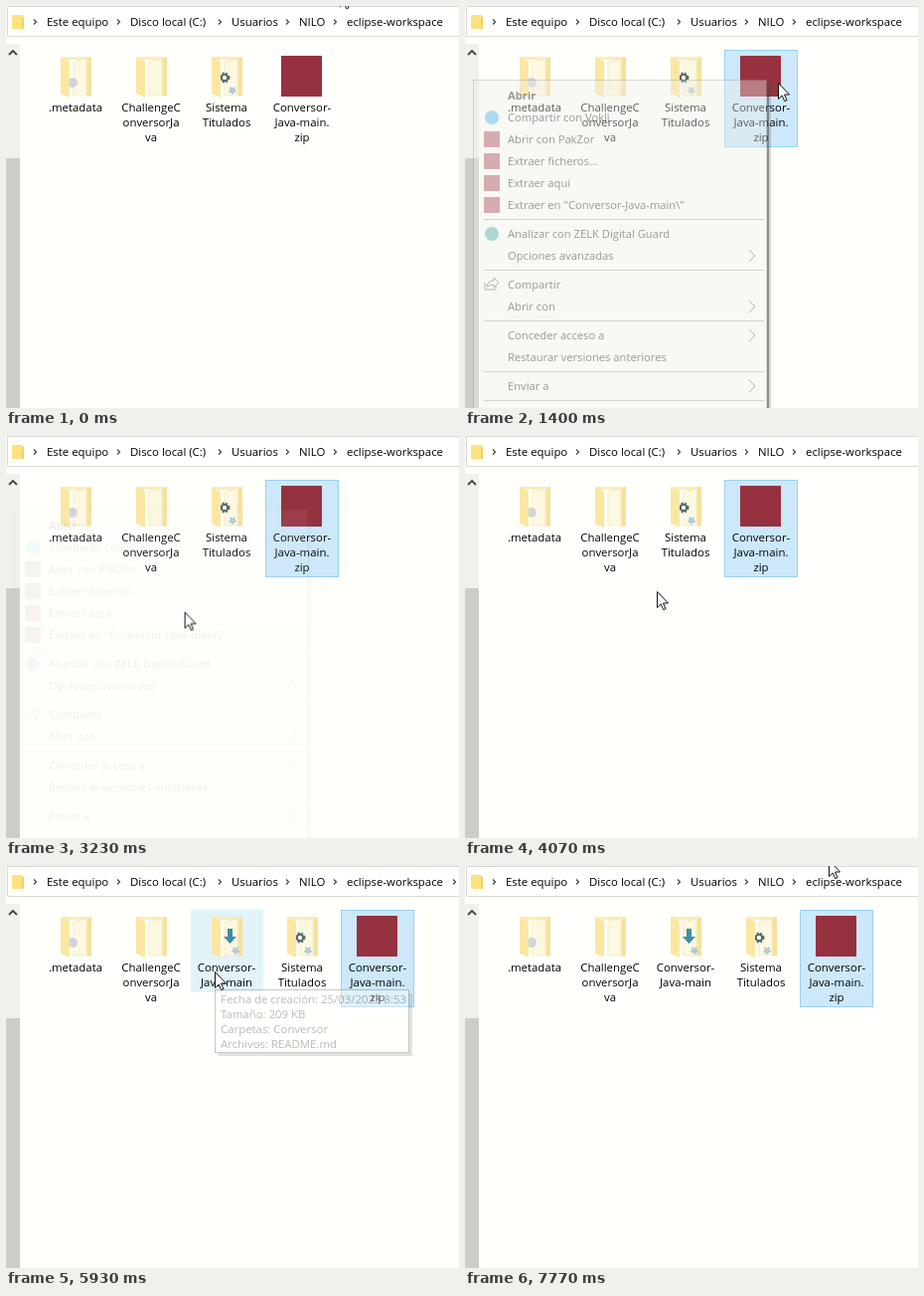
Recreate the animation shown at these times as an HTML page. Size 456x404 px, loop 7830 ms.

```html
<!DOCTYPE html>
<html lang="es">
<head>
<meta charset="utf-8">
<title>Extraer archivo</title>
<style>
html, body { margin: 0; width: 100%; height: 100%; overflow: hidden; background: #fffffc; }
svg { display: block; width: 456px; height: 404px; }
text { font: 11.4px "Open Sans", "Noto Sans", sans-serif; fill: #000; }
#menu text { font-size: 11.2px; }
#tip text { fill: #606060; }
.mid { text-anchor: middle; }
.line { fill: none; stroke: #444; }
#cursor, #moved, #fresh, #pick, #hover, #menu, #shade, #row, #tip, #more {
  animation: 7830ms linear infinite;
}
#cursor { animation-name: cursor; animation-timing-function: ease-in-out; }
#menu { animation-name: menu; }
#tip { animation-name: tip; }
#hover { animation-name: hover; }
#shade { animation-name: shade; }
#moved { animation-name: moved; animation-timing-function: step-end; }
#fresh { animation-name: fresh; animation-timing-function: step-end; }
#pick { animation-name: pick; animation-timing-function: step-end; }
#row { animation-name: row; animation-timing-function: step-end; }
#more { animation-name: more; animation-timing-function: step-end; }

@keyframes cursor {
  0%, .383% { transform: translate(336px, -16px); }
  6.003%, 11.494% { transform: translate(312px, 68px); }
  15.326% { transform: translate(315px, 77px); }
  19.54% { transform: translate(315px, 77px); animation-timing-function: ease-in; }
  21.328% { transform: translate(292px, 133px); animation-timing-function: ease-out; }
  28.48%, 35.3% { transform: translate(174px, 178px); }
  36.143%, 37.931% { transform: translate(178px, 179px); }
  47.254%, 49.808% { transform: translate(184px, 170px); }
  51.98%, 58.365% { transform: translate(193px, 156px); }
  65.134%, 77.3% { transform: translate(210px, 106px); }
  83.014%, 85.951% { transform: translate(361px, 12px); }
  89.017%, 97.957% { transform: translate(354px, 13px); }
  99.2%, 100% { transform: translate(366px, -6px); }
}
@keyframes menu {
  0%, 16.603% { opacity: 0; }
  19.8%, 37.931% { opacity: 1; }
  41.5%, 100% { opacity: 0; }
}
@keyframes shade {
  0%, 16.603% { opacity: 0; }
  17.5%, 37.931% { opacity: 1; }
  41.5%, 100% { opacity: 0; }
}
@keyframes row {
  0% { opacity: 0; transform: translateY(-22px); }
  21.7% { opacity: 1; transform: translateY(-22px); }
  24% { opacity: 1; transform: none; }
  100% { opacity: 1; transform: none; }
}
@keyframes pick {
  0% { opacity: 0; }
  3.83% { opacity: .5; }
  11.494%, 100% { opacity: 1; }
}
@keyframes moved {
  0% { transform: none; }
  54.917%, 100% { transform: translateX(76px); }
}
@keyframes fresh {
  0% { opacity: 0; }
  54.917%, 100% { opacity: 1; }
}
@keyframes hover {
  0%, 61% { opacity: 0; }
  62.5%, 78.8% { opacity: 1; }
  81%, 100% { opacity: 0; }
}
@keyframes tip {
  0%, 75.72% { opacity: 0; }
  75.73% { opacity: .42; }
  77.1%, 80.3% { opacity: 1; }
  83.014% { opacity: .24; }
  84.6%, 100% { opacity: 0; }
}
@keyframes more {
  0% { opacity: 0; }
  61.5% { opacity: 1; }
  98.4%, 100% { opacity: 0; }
}
</style>
</head>
<body>
<svg id="stage" viewBox="0 0 456 404"></svg>
<script>
const text = (x, y, s, extra = '') => `<text x="${x}" y="${y}" ${extra}>${s}</text>`;
const rect = (x, y, w, h, fill, extra = '') =>
  `<rect x="${x}" y="${y}" width="${w}" height="${h}" fill="${fill}" ${extra}/>`;
const disc = (x, y, r, fill) => `<circle cx="${x}" cy="${y}" r="${r}" fill="${fill}"/>`;
const line = (d, extra = '') => `<path class="line" d="${d}" ${extra}/>`;
const label = (x, lines) => lines.map((s, i) => text(x, 106 + 15 * i, s, 'class="mid"')).join('');
const gear = (x, y, r, color = '#4f6570') =>
  `<circle cx="${x}" cy="${y}" r="${r}" fill="none" stroke="${color}" stroke-width="2"/>` +
  `<circle cx="${x}" cy="${y}" r="${r + 1.6}" fill="none" stroke="${color}" stroke-width="1.3" stroke-dasharray="2 1.9"/>`;

const archive = '#96323f';
const pale = '#a9c4d4';

// Folder centred on x, with optional extras drawn on its page
const folder = (x, lines, extra = '') => `<g transform="translate(${x - 70})">
  <path d="M56 51H86V90H60Z" fill="#fcecb4"/>
  <path d="M63 54H73V90H63Z" fill="#fffdf4"/>
  <path d="M68 56L81 53V90H68Z" fill="#fdf8e0" stroke="#f0e6bd" stroke-width=".7"/>
  <path d="M82 53L86 51V90L82 91Z" fill="#f7e19a"/>
  ${extra}
  <path d="M55 51L64 56V92L55 88Z" fill="#fbe7a0"/>
  ${label(70, lines)}</g>`;

const crumbs = [[41, 'Este equipo'], [125, 'Disco local (C:)'], [227, 'Usuarios'], [295, 'NILO'], [343, 'eclipse-workspace']];
const arrow = x => line(`M${x} 13.500l2.500 2.500l-2.500 2.500`, 'stroke-width="1.2"');

const bar =
  `<path d="M456 .5H1.5V30.5H456" fill="#fffffd" stroke="#d9d9d4"/>` +
  rect(6, 9, 11, 14, '#ffe27f') + rect(16, 11, 2, 12, '#f5cf62') +
  crumbs.map(([x, s]) => text(x, 20, s)).join('') +
  [28, 112, 214, 282, 330].map(arrow).join('') +
  `<g id="more">${arrow(450)}</g>`;

const scroll = rect(0, 38, 14, 115, '#f1f1ec') + rect(0, 153, 14, 251, '#cdcdc8') +
  line('M3 49l4 -4l4 4', 'stroke-width="1.8"');

const files =
  folder(70, ['.metadata'], disc(67, 77, 5, '#d3d3e0')) +
  folder(146, ['ChallengeC', 'onversorJa', 'va']) +
  `<g id="fresh">
    <g id="hover">${rect(186, 44, 73, 83, '#e2f4fa')}</g>
    ${folder(222, ['Conversor-', 'Java-main'],
      '<path d="M71 63h5v8h4l-6.500 7l-6.500 -7h4z" fill="#3f8fa6"/>' + gear(79, 85, 1.6, pale))}
  </g>
  <g id="moved">
    ${folder(222, ['Sistema', 'Titulados'], gear(68, 72, 3.2) + gear(76, 85, 1.6, pale))}
    <g id="pick">${rect(261.5, 44.5, 73, 97, '#cce8fa', 'stroke="#99d1f5"')}</g>
    ${rect(277, 50, 41, 41, archive)}
    ${label(298, ['Conversor-', 'Java-main.', 'zip'])}
  </g>`;

const square = y => rect(19, y - 8, 16, 16, archive);
const round = color => y => disc(27, y, 7, color);
const share = y => line(`M20 ${y - 2}v7h11v-3M22 ${y + 2}q1 -6 7 -6v-3l5 5l-5 5v-3q-4 0 -7 2z`);
const sub = y => line(`M286 ${y - 6}l6 6l-6 6`);
const items = [
  [90, 'Abrir'],
  [112, 'Compartir con Vokli', round('#2ba6da')],
  [134, 'Abrir con PakZor', square],
  [156, 'Extraer ficheros...', square],
  [178, 'Extraer aquí', square],
  [200, 'Extraer en "Conversor-Java-main\\"', square],
  [229, 'Analizar con ZELK Digital Guard', round('#359c94')],
  [251, 'Opciones avanzadas', sub],
  [280, 'Compartir', share],
  [302, 'Abrir con', sub],
  [331, 'Conceder acceso a', sub],
  [353, 'Restaurar versiones anteriores'],
  [382, 'Enviar a', sub]
];
const menu = `<g id="shade">
  ${rect(304, 77, 2, 327, '#444', 'opacity=".6"')}
  ${rect(306, 79, 2, 325, '#444', 'opacity=".22"')}
</g>
<g id="menu">
  ${rect(8.5, 74.5, 295, 340, '#eeeee9', 'stroke="#a0a09c"')}
  <g id="row">${rect(11, 167, 291, 22, '#fffffc')}</g>
  ${[215, 266, 317, 368, 397].map(y => rect(19, y - 1, 282, 1, '#919191')).join('')}
  ${items.map(([y, s, icon], i) =>
    text(43, y + 4, s, i ? '' : 'style="font-weight:700"') + (icon ? icon(y) : '')).join('')}
</g>`;

const facts = ['Fecha de creación: 25/03/2023 8:53', 'Tamaño: 209 KB', 'Carpetas: Conversor', 'Archivos: README.md'];
const tip = `<g id="tip">
  ${rect(213, 128, 196, 63, '#555', 'opacity=".4"')}
  ${rect(210.5, 124.5, 195, 63, '#fffffc', 'stroke="#80807c"')}
  ${facts.map((s, i) => text(216, 138 + 15 * i, s)).join('')}
</g>`;

const cursor = `<path id="cursor" d="M.5 .5V16.500L4.200 13L6.800 18.700L9 17.700L6.500 12H11.500Z"
  fill="#fff" stroke="#111"/>`;

document.getElementById('stage').innerHTML =
  rect(0, 0, 456, 404, '#fffffc') + bar + scroll + files + tip + menu + cursor;
</script>
</body>
</html>
```
